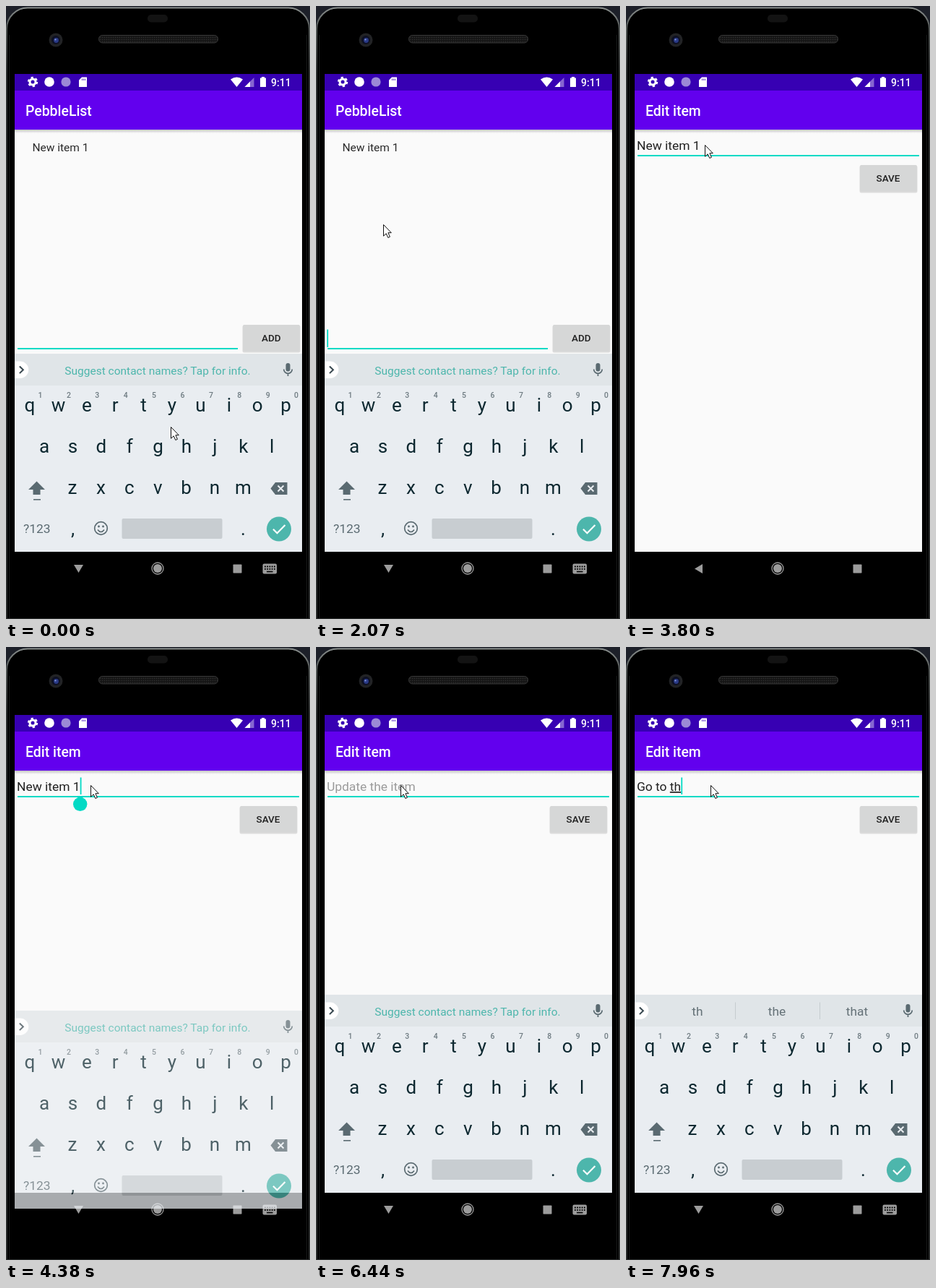
Animation of 421x848 px, one loop 8000 ms. Source, as an HTML page:

```html
<!DOCTYPE html>
<html lang="en">
<head>
<meta charset="utf-8">
<title>Todo list on a phone</title>
<style>
  html, body { margin: 0; width: 100%; height: 100%; overflow: hidden; background: #000; }
  svg { display: block; font-family: Roboto, "Noto Sans", sans-serif; }
  text { white-space: pre; }
  .title { font-size: 19.4px; font-weight: 500; fill: #fff; }
  .button { font-size: 13.5px; font-weight: 500; fill: #212121; text-anchor: middle; }
  .item { font-size: 15.5px; fill: #2a2a2a; }
  .field { font-size: 17.4px; fill: #212121; }
  .compose { text-decoration: underline; }
  .accent { fill: #03dac5; }
  .key { font-size: 26px; fill: #0d2830; text-anchor: middle; }
  .digit { font-size: 10.5px; font-weight: 500; fill: #6d7a80; text-anchor: middle; }
  .promo { font-size: 15.5px; fill: #4db6ac; text-anchor: middle; }
  .word { font-size: 17.4px; fill: #647177; text-anchor: middle; }
  .icon { fill: #5a6a71; }
  .line { fill: none; stroke: #5a6a71; stroke-width: 1.7; }
  .nav { fill: #9c9c9c; }
</style>
</head>
<body>
<svg width="421" height="848" viewBox="0 0 421 848">
  <defs>
    <linearGradient id="rim" x2="0" y2="1">
      <stop offset="0" stop-color="#8b908e"/>
      <stop offset=".035" stop-color="#4c504f"/>
      <stop offset=".1" stop-color="#2b2d2d"/>
      <stop offset="1" stop-color="#262828"/>
    </linearGradient>
    <linearGradient id="shade" x2="0" y2="1">
      <stop offset="0" stop-color="#000" stop-opacity=".22"/>
      <stop offset="1" stop-color="#000" stop-opacity="0"/>
    </linearGradient>
    <pattern id="mesh" width="3" height="3" patternUnits="userSpaceOnUse">
      <rect width="3" height="3" fill="#151515"/>
      <circle cx="1.5" cy="1.5" r=".8" fill="#303030"/>
    </pattern>
    <g id="bar">
      <rect x="12" y="117" width="398" height="54" fill="#6200ee"/>
      <rect x="12" y="171" width="398" height="5" fill="url(#shade)"/>
    </g>
    <g id="btn">
      <rect x="-.5" y=".5" width="80" height="38" rx="2.5" fill="#000" opacity=".12"/>
      <rect width="79" height="36.5" rx="2" fill="#d6d7d7"/>
    </g>
  </defs>

  <!-- phone body -->
  <rect width="421" height="848" fill="#1d2029"/>
  <rect x="1" y="2.5" width="419" height="900" rx="29" fill="#000" stroke="url(#rim)" stroke-width="2"/>
  <path d="M4.5 40V848M416.500 40V848" stroke="#171919"/>
  <path d="M0 847.500H421" stroke="#2b2d2d"/>
  <rect x="196" y="12" width="28" height="10.500" rx="5" fill="#131313"/>
  <rect x="128.500" y="40.500" width="165" height="10.500" rx="5" fill="url(#mesh)" stroke="#383838"/>
  <circle cx="69" cy="47" r="9.500" fill="#222325"/>
  <circle cx="69" cy="47" r="6" fill="#0d1024"/>
  <circle cx="69.500" cy="47.500" r="3.400" fill="#2a3a86"/>
  <circle cx="68.500" cy="46.500" r="1.100" fill="#8fa0e0"/>

  <!-- list screen -->
  <g id="list">
    <rect x="12" y="117" width="398" height="638" fill="#fafafa"/>
    <use href="#bar"/>
    <text class="title" x="27" y="152">PebbleList</text>
    <text class="item" x="36.500" y="200.500">New item 1</text>
    <rect class="accent" x="16" y="473" width="305" height="2"/>
    <rect class="accent" id="listCaret" x="15.200" y="447.500" width="1.800" height="24.500"/>
    <use href="#btn" x="328" y="441"/>
    <text class="button" x="367.300" y="464">ADD</text>
  </g>

  <!-- edit screen -->
  <g id="edit">
    <rect x="12" y="117" width="398" height="638" fill="#fafafa"/>
    <use href="#bar"/>
    <text class="title" x="27" y="152">Edit item</text>
    <text class="field" id="hint" x="15" y="199" style="fill:#9b9b9b">Update the item</text>
    <text class="field" id="field" x="15" y="199"><tspan></tspan><tspan class="compose"></tspan></text>
    <rect class="accent" x="16" y="206" width="390" height="2"/>
    <rect class="accent" id="editCaret" y="180.500" width="1.800" height="23.500"/>
    <path class="accent" id="handle" d="M0 206L6.800 210.500A9.700 9.700 0 1 1 -6.800 210.500Z"/>
    <use href="#btn" x="324" y="220"/>
    <text class="button" x="363" y="243">SAVE</text>
  </g>

  <!-- status bar -->
  <rect id="status" x="12" y="94" width="398" height="23" fill="#3700b3"/>
  <g fill="#fff">
    <g fill="none" stroke="#fff">
      <circle cx="37" cy="105" r="4" stroke-width="3"/>
      <circle cx="37" cy="105" r="6" stroke-width="2.400" stroke-dasharray="3.140 3.140"/>
    </g>
    <circle cx="60" cy="105" r="6.800"/>
    <circle cx="83" cy="105" r="6.600" fill="#9c8ad6"/>
    <path d="M105 98.500H112V112H101V102.500Z"/>
    <path d="M105.500 100.500V103M107.500 100.500V103M109.500 100.500V103" stroke="#3700b3" stroke-width=".8"/>
    <path d="M311 101.500Q319.500 95.500 328 101.500L319.500 112Z"/>
    <path d="M330.500 112L343.500 99V112Z" opacity=".4"/>
    <path d="M330.500 112L338 104.500V112Z"/>
    <path d="M352 99.500H354V98H358V99.500H360V112H352Z"/>
    <text x="367" y="111" font-size="14" font-weight="500">9:11</text>
  </g>

  <!-- navigation bar -->
  <path class="nav" id="back" d="M94 773H107L100.500 784Z"/>
  <circle cx="210" cy="778" r="8" fill="none" stroke="#9c9c9c" stroke-width="1.300"/>
  <circle class="nav" cx="210" cy="778" r="6"/>
  <rect class="nav" x="314.500" y="772.500" width="12" height="12" rx=".8"/>
  <g id="imeIcon">
    <rect class="nav" x="355.500" y="771.500" width="19.500" height="14" rx="2"/>
    <path d="M358 775.500H373M358 778.800H373" stroke="#000" stroke-width="1.800" stroke-dasharray="1.800 1.450"/>
    <path d="M361 782.500H369.500" stroke="#000" stroke-width="1.600"/>
  </g>

  <!-- keyboard -->
  <g id="keyboard">
    <rect x="12" y="481" width="398" height="274" fill="#e9edf1"/>
    <rect x="12" y="481" width="398" height="44" fill="#e0e5e8"/>
    <path d="M12 491.500H19.500A11.700 11.700 0 0 1 19.500 515H12Z" fill="#fff"/>
    <path class="line" d="M18.800 498.500L23.800 503.300L18.800 508.100" style="stroke:#37474f;stroke-width:2"/>
    <text class="promo" id="promo" x="210" y="509.500">Suggest contact names? Tap for info.</text>
    <g id="words">
      <path d="M151.500 491.500V515M268.500 491.500V515" stroke="#c5cbcf"/>
      <text class="word" x="99" y="510"></text>
      <text class="word" x="209" y="510"></text>
      <text class="word" x="320" y="510"></text>
    </g>
    <rect class="icon" x="387.500" y="494" width="6" height="11.500" rx="3"/>
    <path class="line" d="M384.700 502.500A5.800 5.800 0 0 0 396.300 502.500M390.500 508V512"/>
    <g id="keys"></g>
    <path class="icon" d="M42.500 657.500L54 669H47.500V676H37.500V669H31Z"/>
    <rect class="icon" x="38" y="682" width="10" height="1.600"/>
    <path class="icon" d="M366.500 667.500L373 659H389.500V676H373Z"/>
    <path d="M376.500 663.500L384.500 671.500M384.500 663.500L376.500 671.500" stroke="#e9edf1" stroke-width="2"/>
    <text x="24" y="729" font-size="17.400" fill="#5a6a71">?123</text>
    <circle class="line" cx="131.500" cy="722.500" r="8.800"/>
    <path class="line" d="M127 724.500Q131.500 730.500 136 724.500"/>
    <circle class="icon" cx="128.500" cy="720" r="1.400"/>
    <circle class="icon" cx="134.500" cy="720" r="1.400"/>
    <rect x="160.500" y="709" width="139" height="28" rx="2" fill="#c8cdd1"/>
    <circle cx="378" cy="723.500" r="17" fill="#4db6ac"/>
    <path d="M370 723.800L375.500 729.200L386.500 718" fill="none" stroke="#fff" stroke-width="2.200"/>
  </g>

  <path id="pointer" d="M.5 .5V16.200L4.200 12.800L6.800 18.500L9.400 17.300L6.900 11.700H11.300Z" fill="#fff" stroke="#111" stroke-width="1"/>
</svg>

<script>
const LOOP = 8000;
const $ = id => document.getElementById(id);
const show = (id, on) => { $(id).style.display = on ? '' : 'none'; };
const shift = (id, x, y) => $(id).setAttribute('transform', `translate(${x} ${y})`);

const at = (track, t) => track.filter(step => step[0] <= t).pop();

const pointer = [
  [0, 228, 582], [120, 229, 587], [270, 232, 595], [390, 244, 580], [540, 262, 545],
  [660, 280, 505], [810, 295, 465], [960, 304, 432], [1110, 307, 416], [1260, 306, 414],
  [1380, 306, 410], [1530, 306, 404], [1650, 306, 396], [1800, 288, 375], [1950, 233, 351],
  [2070, 93, 302], [2220, 79, 229], [2340, 67, 191], [2620, 85, 191], [3410, 89, 191],
  [3560, 99, 192], [3680, 109, 192], [3830, 115, 191], [3950, 117, 191]
];

const listCaret = [[0, 0], [120, 1], [660, 0], [1110, 1], [1650, 0], [2070, 1], [2620, 0]];
const editCaret = [[0, 1], [3680, 0], [4260, 1], [4770, 0], [5140, 1], [6440, 0], [6900, 1]];

// time, drop in px
const editDrop = [[0, 9], [3140, 2], [3290, 0]];

// time, drop in px, opacity
const keyboard = [[0, 0, 1], [3020, 0, 0], [4260, 30, .2], [4380, 22, .72], [4500, 0, 1]];

// time, finished text, word being composed, suggestions
const typing = [
  [0, 'New item 1', ''],
  [5290, 'New item ', ''],
  [5730, 'New i', ''],
  [5880, '', ''],
  [7180, '', 'G', 'G Go Good'],
  [7310, '', 'Go', 'Go Good Going'],
  [7440, 'Go ', '', 'to back home'],
  [7570, 'Go ', 't', 't to the'],
  [7700, 'Go ', 'to', 'to too today'],
  [7830, 'Go to ', 't', 't the to'],
  [7960, 'Go to ', 'th', 'th the that']
];

function buildKeys() {
  const pitch = 39.4;
  const row = (chars, x, y, cls = 'key') => [...chars].map((c, i) =>
    `<text class="${cls}" x="${x + pitch * i}" y="${y}">${c}</text>`).join('');
  $('keys').innerHTML =
    row('qwertyuiop', 33, 561) + row('1234567890', 47.5, 542, 'digit') +
    row('asdfghjkl', 53, 618) + row('zxcvbnm', 92, 675) +
    row(',', 92.5, 732) + row('.', 328.5, 732);
}

function drawField(t) {
  const [, done, word, suggestions] = at(typing, t);
  const [doneSpan, wordSpan] = $('field').children;
  doneSpan.textContent = done;
  wordSpan.textContent = word;
  show('hint', !done && !word);

  const tapped = t >= 4260;
  const caretX = tapped ? 15 + $('field').getComputedTextLength() : 15;
  $('editCaret').setAttribute('x', caretX + .2);
  show('editCaret', at(editCaret, t)[1]);
  show('handle', tapped && t < 5140);
  shift('handle', 102.7, 0);

  show('promo', !suggestions);
  show('words', suggestions);
  if (suggestions) {
    const slots = $('words').querySelectorAll('text');
    suggestions.split(' ').forEach((s, i) => { slots[i].textContent = s; });
  }
}

function draw(t) {
  const editing = t >= 3020;
  const drop = editing ? at(editDrop, t)[1] : 0;
  show('list', !editing);
  show('edit', editing);
  shift('edit', 0, drop);
  $('status').setAttribute('height', 23 + drop);
  show('listCaret', at(listCaret, t)[1]);
  drawField(t);

  const [, fall, opacity] = at(keyboard, t);
  shift('keyboard', 0, fall);
  $('keyboard').setAttribute('opacity', opacity);
  show('imeIcon', opacity > 0);
  $('back').setAttribute('transform', opacity > 0 ? '' : 'rotate(90 100.5 778.5)');

  const [, x, y] = at(pointer, t);
  shift('pointer', x, y);
}

function tick() {
  draw(performance.now() % LOOP);
  requestAnimationFrame(tick);
}

buildKeys();
tick();
</script>
</body>
</html>
```
